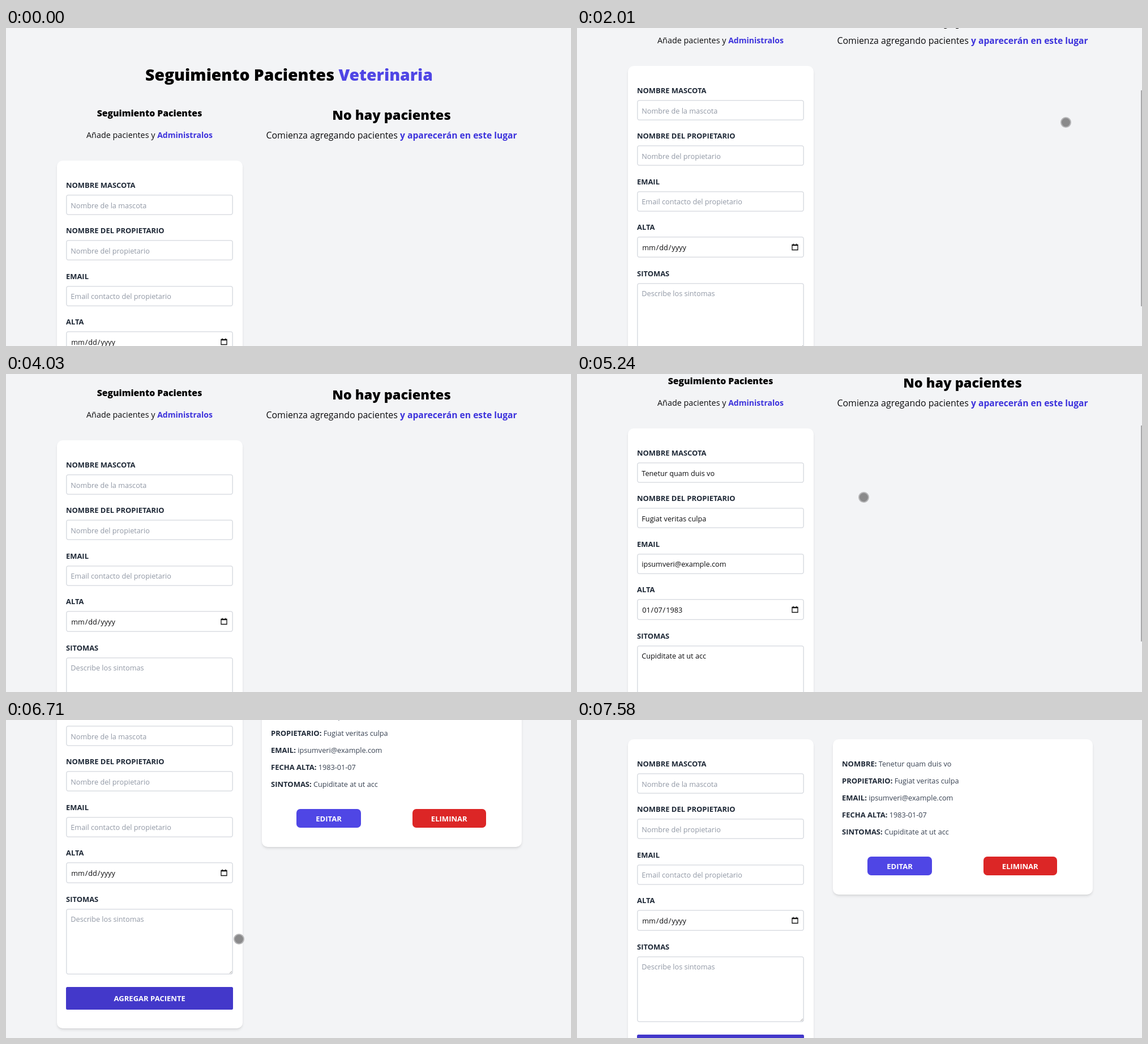
These frames come from a looping animation (998x561 px, 8 s). An HTML page:

```html
<!DOCTYPE html>
<html lang="es">
<head>
<meta charset="utf-8">
<title>Seguimiento Pacientes Veterinaria</title>
<style>
  html, body { margin: 0; width: 100%; height: 100%; overflow: hidden; background: #f3f4f6; }
  #stage { position: relative; width: 998px; height: 561px; overflow: hidden; background: #f3f4f6; font-family: "Open Sans", "Noto Sans", sans-serif; }
  #page { position: absolute; left: 0; top: 0; width: 998px; height: 845px; }
  #page div, #page svg { position: absolute; }
  .text { line-height: 0; white-space: pre; color: #0b0b0d; }
  .center { transform: translateX(-50%); }
  .black { font-weight: 800; color: #000; }
  .bold { font-weight: 700; }
  .accent { color: #4f46e5; }
  .text b { font-size: .98em; color: #3d33dc; }
  .label, .row b { font-weight: 700; color: #1f2937; }
  .row { color: #374151; }
  .row b { font-size: 13px; }
  .hint { color: #9198a5; }
  .white { color: #fff; }
  .text i { font-style: normal; padding: 0 .9px; }
  .card { background: #fff; border-radius: 10px; box-shadow: 0 3.3px 5px -.8px #0000001a, 0 1.7px 3.3px -1.7px #0000001a; }
  .input { background: #fff; border-radius: 4.2px; box-shadow: inset 0 0 0 1.6px #dbdee3; }
  .value, #page.filled .empty, .saved-only, #page.saved .unsaved { visibility: hidden; }
  #page.filled .value, #page.saved .saved-only { visibility: visible; }
  #thumb { position: absolute; left: 996px; top: 0; width: 2px; height: 381px; background: #a8a8aa; }
  #cursor { position: absolute; left: -9.5px; top: -9.5px; width: 19px; height: 19px; box-sizing: border-box; border: 2px solid #b5b5b7; border-radius: 50%; background: #8a8a8b; }
</style>
</head>
<body>
<div id="stage">
  <div id="page"></div>
  <div id="thumb"></div>
  <div id="cursor"></div>
</div>
<script>
const LOOP = 8000, FILL_AT = 4810, SAVE_AT = 6330;
const [page, thumb, cursor] = ['page', 'thumb', 'cursor'].map(id => document.getElementById(id));

const add = html => page.insertAdjacentHTML('beforeend', html);
const text = (x, y, size, html, cls = '') =>
  add(`<div class="text ${cls}" style="left:${x}px;top:${y}px;font-size:${size}px">${html}</div>`);
const box = (x, y, w, h, cls = '', style = '', id = '') =>
  add(`<div id="${id}" class="${cls}" style="left:${x}px;top:${y}px;width:${w}px;height:${h}px;${style}"></div>`);
const button = (x, y, w, h, label, color, radius, cls = '', id = '') => {
  box(x, y, w, h, cls, `background:${color};border-radius:${radius}px`, id);
  text(x + w / 2, y + h / 2 + .2, 13.05, label, 'center bold white ' + cls);
};
const dateParts = date => date.split('/').map(part => `<i>${part}</i>`).join('/');

const patient = {
  name: 'Tenetur quam duis vo',
  owner: 'Fugiat veritas culpa',
  email: 'ipsumveri@example.com',
  symptoms: 'Cupiditate at ut acc'
};

// Headings
text(500, 82.3, 28.35, 'Seguimiento Pacientes <span class="accent">Veterinaria</span>', 'center black');
text(253.5, 150.4, 15.75, 'Seguimiento Pacientes', 'center black');
text(253.5, 188.8, 14.35, 'Añade pacientes y <b>Administralos</b>', 'center');
text(681, 153.2, 23.5, 'No hay pacientes', 'center black unsaved');
text(681, 189.3, 15.95, 'Comienza agregando pacientes <b>y aparecerán en este lugar</b>', 'center unsaved');

// Form
box(89.5, 233.8, 328.5, 594.7, 'card');
const fields = [
  ['NOMBRE MASCOTA', 'Nombre de la mascota', patient.name, 277.2, 36],
  ['NOMBRE DEL PROPIETARIO', 'Nombre del propietario', patient.owner, 357.4, 36],
  ['EMAIL', 'Email contacto del propietario', patient.email, 437.5, 36],
  ['ALTA', dateParts('mm/dd/yyyy'), dateParts('01/07/1983'), 517.7, 37.5],
  ['SITOMAS', 'Describe los sintomas', patient.symptoms, 599.7, 116]
];
for (const [label, hint, value, y, h] of fields) {
  const top = y + 17, isDate = label === 'ALTA';
  const textY = top + (isDate ? 19 : 18.3);
  text(106, y, 12.95, label, 'label');
  box(106, top, 295, h, 'input');
  text(114.3, textY, 12.7, hint, isDate ? 'empty' : 'hint empty');
  text(114.3, textY, 12.7, value, 'value');
}
add(`<svg style="left:379px;top:547px" width="12" height="13" fill="none" stroke="#111">
  <path d="M1 2.5h10v9H1zM3.2 .5v2M8.8 .5v2" stroke-width="1.3"/><path d="M1 3.2h10" stroke-width="2"/></svg>
  <svg style="left:394px;top:726px" width="6" height="6" stroke="#888" stroke-width=".8"><path d="M1 5L5 1M3.5 5L5 3.5"/></svg>`);
button(106, 755, 295.4, 40, 'AGREGAR PACIENTE', '#4f46e5', 2.5, '', 'submit');

// Saved patient
box(451.5, 233.8, 459, 274, 'card saved-only');
[
  ['NOMBRE', patient.name],
  ['PROPIETARIO', patient.owner],
  ['EMAIL', patient.email],
  ['FECHA ALTA', '1983-01-07'],
  ['SINTOMAS', patient.symptoms]
].forEach(([label, value], i) =>
  text(468, 277.2 + i * 30.06, 12.7, `<b>${label}:</b> ${value}`, 'row saved-only'));
button(513, 440.8, 114, 33.4, 'EDITAR', '#4f46e5', 6.7, 'saved-only');
button(717.5, 440.8, 130.5, 33.4, 'ELIMINAR', '#dc2626', 6.7, 'saved-only');

// Motion tracks: time followed by values
const scrollTrack = [
  [0, 0], [1690, 0], [2010, 167], [2260, 167], [2540, 284], [3150, 284], [3560, 117],
  [5160, 117], [5530, 284], [6920, 284], [7280, 200]
];
const cursorTrack = [
  [450, 904, 530], [510, 889, 500], [560, 897, 480], [680, 897, 480], [940, 863, 166],
  [3230, 863, 166], [3480, 890, -15], [4940, 800, -15], [5220, 506, 217], [5640, 506, 217],
  [5990, 300, 490], [6480, 300, 490], [6710, 411, 386], [6800, 411, 386], [7160, 701, 54]
];
// Scrollbar: shown from, fade start, fade end
const thumbShows = [[1690, 2830, 3150], [3150, 3720, 4030], [5160, 5850, 6150], [6920, 7300, 7580]];

const clamp = v => Math.min(1, Math.max(0, v));
const progress = (t, a, b) => clamp((t - a) / (b - a));
const smooth = p => p * p * (3 - 2 * p);

function sample(track, t) {
  const next = track.findIndex(key => key[0] > t);
  if (next < 1) return track.at(next).slice(1);
  const from = track[next - 1], to = track[next];
  const p = smooth(progress(t, from[0], to[0]));
  return from.slice(1).map((v, i) => v + (to[i + 1] - v) * p);
}

function draw(t) {
  const scroll = Math.round(sample(scrollTrack, t)[0]);
  page.style.transform = `translateY(${-scroll}px)`;
  page.classList.toggle('filled', t >= FILL_AT && t < SAVE_AT);
  page.classList.toggle('saved', t >= SAVE_AT);

  const hover = progress(t, 5880, 6030);
  const shade = [[79, 67], [70, 56], [229, 202]].map(([a, b]) => a + (b - a) * hover);
  document.getElementById('submit').style.background = `rgb(${shade})`;

  const show = thumbShows.find(([start, , end]) => t >= start && t < end);
  thumb.style.opacity = show ? 1 - progress(t, show[1], show[2]) : 0;
  thumb.style.transform = `translateY(${scroll * .658}px)`;

  const [x, y] = sample(cursorTrack, t);
  cursor.style.transform = `translate(${x}px,${y}px)`;
  cursor.style.opacity = t < 450 ? 0 : 1 - progress(t, 7310, 7560);
}

const start = performance.now();
function tick() {
  draw((performance.now() - start) % LOOP);
  requestAnimationFrame(tick);
}
tick();
</script>
</body>
</html>
```
